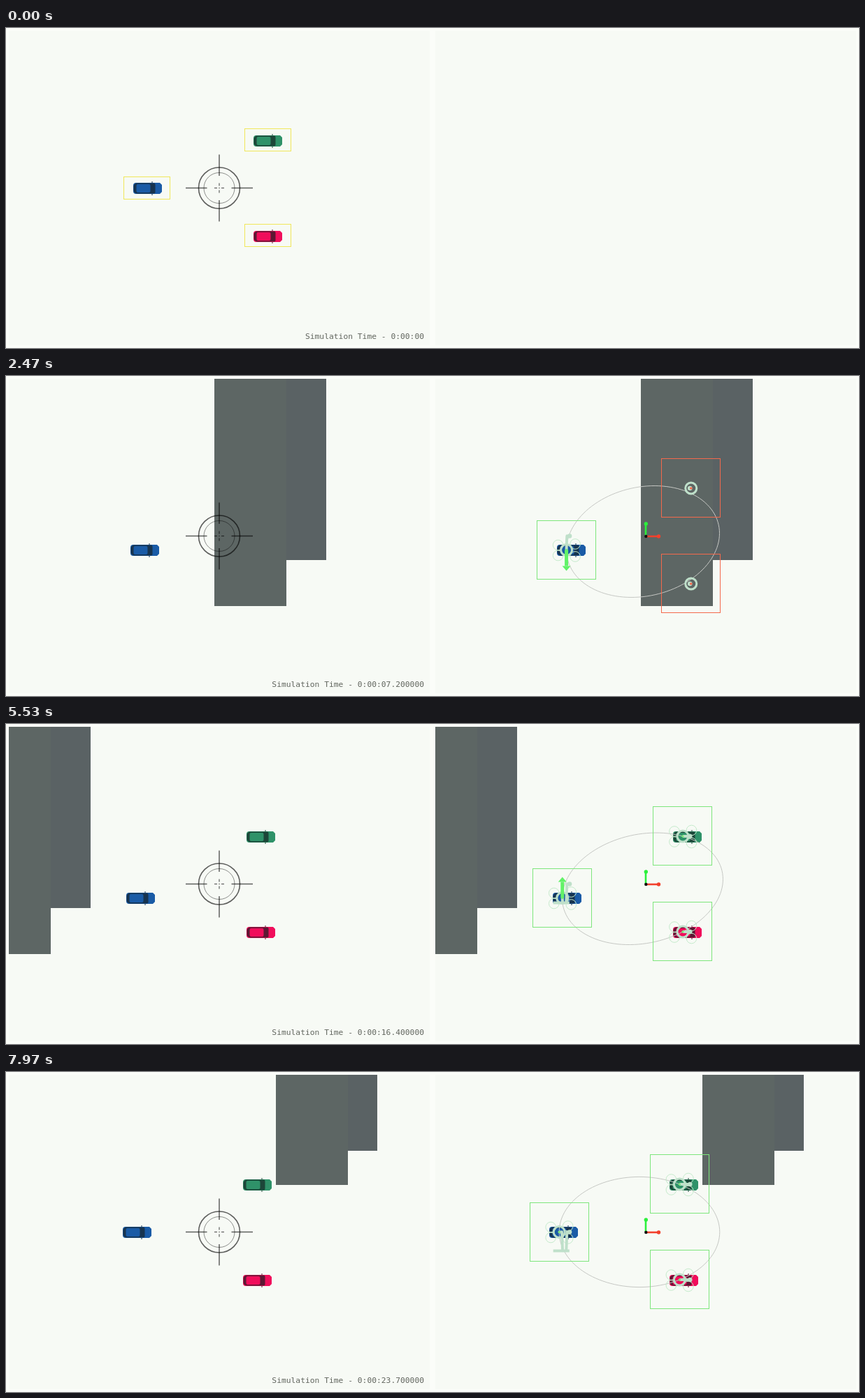
Animation of 1220 by 459 pixels, one loop 8 s. Source, as an HTML page with a canvas:

```html
<!DOCTYPE html>
<html>
<head>
<meta charset="utf-8">
<title>Vehicle tracking simulation</title>
<style>
html, body { margin: 0; width: 100%; height: 100%; overflow: hidden; background: #fbfdf9; }
canvas { display: block; }
</style>
</head>
<body>
<canvas id="stage" width="1220" height="459"></canvas>
<script>
const ctx = document.getElementById('stage').getContext('2d');
const TAU = Math.PI * 2, PALE = '#bfe0ca', GROUND = '#f7faf5', EDGE = '#fbfdf9';
const HALF_L = 20.5, HALF_W = 8.5, DRIFT = 0.63;

// lag: shift of the formation estimate while a car is hidden
const cars = [
  { x: 202.6, y: 230, body: '#1a5ba6', dark: '#17344f', lag: [-14, 12], swerves: true },
  { x: 374.8, y: 161.5, body: '#2f9269', dark: '#1d4639', lag: [-14, 2] },
  { x: 374.8, y: 298.5, body: '#f00e5b', dark: '#5c1833', lag: [-14, 2] }
];
const keypoints = [[-18.5, -7.5], [-18.5, 7.5], [6, -9], [6, 9]];

function smooth(a, b, v) {
  const u = Math.min(1, Math.max(0, (v - a) / (b - a)));
  return u * u * (3 - 2 * u);
}

function carAt(car, s) {
  const swerve = car.swerves ? 27 * (smooth(5.8, 7.9, s) - smooth(15.7, 17.8, s)) : 0;
  return { x: car.x - DRIFT * s, y: car.y + swerve };
}

// Rectangles: x, width, bottom, colour
function blocksAt(s) {
  const a = Math.round(386.4 - 36.7 * (s - 4.8)), b = Math.round(386.4 - 36.9 * (s - 23.7));
  return [
    [a, 103, 330, '#5d6664'], [a + 103, 57, 264, '#5a6264'],
    [b, 103, 162, '#5d6664'], [b + 103, 42, 113, '#5a6264']
  ];
}

function hiddenPart(p, s) {
  let area = 0;
  for (const [x, w, bottom] of blocksAt(s)) {
    const dx = Math.min(p.x + HALF_L, x + w) - Math.max(p.x - HALF_L, x);
    const dy = Math.min(p.y + HALF_W, bottom) - (p.y - HALF_W);
    if (dx > 0 && dy > 0) area += dx * Math.min(dy, 2 * HALF_W);
  }
  return area / (4 * HALF_L * HALF_W);
}

function trackAt(car, s) {
  const p = carAt(car, s), hidden = hiddenPart(p, s), k = smooth(0.2, 0.5, hidden);
  const recoil = car.swerves ? smooth(14.4, 15, s) - smooth(15, 15.6, s) : 0;
  return { x: p.x - 6.5 + 6 * k - 14 * recoil, y: p.y - 0.5, hidden, k, car: p };
}

// Share of the last two seconds spent out of sight
function lostShare(car, s) {
  let sum = 0;
  for (let i = 0; i < 10; i++) sum += trackAt(car, s - i * 0.2).k;
  return sum / 10;
}

function line(points, color, width) {
  ctx.beginPath();
  points.forEach(([x, y]) => ctx.lineTo(x, y));
  ctx.strokeStyle = color;
  ctx.lineWidth = width;
  ctx.stroke();
}

function circle(x, y, r, color, width) {
  ctx.beginPath();
  ctx.arc(x, y, r, 0, TAU);
  if (width) {
    ctx.strokeStyle = color;
    ctx.lineWidth = width;
    ctx.stroke();
  } else {
    ctx.fillStyle = color;
    ctx.fill();
  }
}

// Outline snapped to whole pixels
function box(x, y, w, h, color) {
  ctx.strokeStyle = color;
  ctx.lineWidth = 1;
  ctx.strokeRect(Math.floor(x - w / 2) + 0.5, Math.floor(y - h / 2) + 0.5, w, h);
}

function shape(points, color) {
  ctx.fillStyle = color;
  ctx.beginPath();
  points.forEach(([x, y]) => ctx.lineTo(x, y));
  ctx.fill();
}

function roundBox(x, y, w, h, r, color) {
  ctx.fillStyle = color;
  ctx.beginPath();
  ctx.roundRect(x, y, w, h, r);
  ctx.fill();
}

function drawCar(car, s) {
  const p = carAt(car, s);
  ctx.save();
  ctx.translate(Math.floor(p.x) + 0.5, Math.round(p.y));
  line([[6.5, -10], [6.5, 10]], car.dark, 1);
  roundBox(-HALF_L, -8, 36, 16, 4, car.body);
  shape([[10, -8], [17.5, -8], [20.5, -5], [20.5, 5], [17.5, 8], [10, 8]], car.body);
  roundBox(-20, -7.5, 31, 15, [5, 2, 2, 5], car.dark);
  roundBox(-16, -6, 20, 12, 2, car.body);
  ctx.restore();
}

function drawScene(s, started) {
  ctx.fillStyle = GROUND;
  ctx.fillRect(4, 4, 602, 451);
  cars.forEach(car => drawCar(car, s));
  if (!started) return;
  for (const [x, w, bottom, color] of blocksAt(s)) {
    ctx.fillStyle = color;
    ctx.fillRect(x, 4, w, bottom - 4);
  }
}

function drawSight() {
  const ink = 'rgba(0,0,0,.62)';
  ctx.save();
  ctx.translate(305, 229.5);
  circle(0, 0, 29.5, ink, 1.6);
  circle(0, 0, 22, ink, 0.7);
  for (let i = 0; i < 4; i++) {
    line([[17.5, 0], [48, 0]], ink, 1.5);
    line([[3, 0], [7, 0]], ink, 1.2);
    ctx.rotate(TAU / 4);
  }
  circle(0, 0, 0.8, ink);
  ctx.restore();
}

function drawClock(s) {
  const sec = String(Math.floor(s)).padStart(2, '0'), tenth = Math.round(s * 10) % 10;
  ctx.fillStyle = '#62665f';
  ctx.font = '11.3px "DejaVu Sans Mono", monospace';
  ctx.textAlign = 'right';
  ctx.fillText(`Simulation Time - 0:00:${sec}${tenth ? `.${tenth}00000` : ''}`, 598, 445.5);
}

// Ellipse of least area through the three estimated points
function drawFormation(tracks, s) {
  const [a, b, c] = tracks.map((t, i) => {
    const lost = lostShare(cars[i], s), [dx, dy] = cars[i].lag;
    return [t.car.x - 6.5 + (dx + 6) * lost, t.y + dy * lost];
  });
  const mid = [0, 1].map(j => (a[j] + b[j] + c[j]) / 3);
  const points = [];
  for (let i = 0; i <= 120; i++) {
    const u = TAU * i / 120;
    points.push(mid.map((m, j) =>
      m + (a[j] - m) * Math.cos(u) + (c[j] - b[j]) / Math.sqrt(3) * Math.sin(u)));
  }
  line(points, '#c6c8c4', 1);
}

function drawTrack(car, t, s) {
  const color = t.hidden > 0.88 ? '#f4694c' : t.hidden > 0.4 ? '#eda45c' : '#7ee67c';
  const blocks = blocksAt(s);
  for (const [dx, dy] of keypoints) {
    const x = t.car.x + dx, y = t.car.y + dy;
    const covered = blocks.some(([bx, w, bottom]) => x > bx - 1 && x < bx + w + 4 && y < bottom + 4);
    if (!covered) circle(x, y, 7.3, '#c5ebcc', 1);
  }
  const trail = [];
  for (let u = 0; u <= s + 0.01; u += 0.1) {
    const p = trackAt(car, u);
    trail.push([p.x, p.y]);
  }
  line(trail, PALE, 4);
  circle(...trail[0], 3.2, PALE);
  circle(t.x, t.y, 8, PALE, 3);
  circle(t.x, t.y, 1.8, color);

  const vy = (carAt(car, s + 0.05).y - carAt(car, s - 0.05).y) * 10;
  if (Math.abs(vy) > 2) {
    const tip = t.y + vy * 1.75, head = tip - Math.sign(vy) * 7;
    line([[t.x, t.y], [t.x, head]], '#62f268', 5);
    shape([[t.x - 6, head], [t.x + 6, head], [t.x, tip]], '#62f268');
  }
  box(t.x, t.y - 0.3, 84, 84, color);
}

function drawAxes() {
  line([[305, 230], [323, 230]], '#f2402c', 2.6);
  line([[305, 230], [305, 212]], '#2cf03c', 2.6);
  circle(323.5, 230, 2.7, '#f2402c');
  circle(305.3, 212, 2.7, '#2cf03c');
  circle(305.3, 230, 2.2, '#111');
}

function panel(offset, draw) {
  ctx.save();
  ctx.translate(offset, 0);
  ctx.beginPath();
  ctx.rect(4, 4, 602, 451);
  ctx.clip();
  draw();
  ctx.restore();
}

const start = performance.now();
function frame() {
  const time = Math.max(0, performance.now() - start) % 8000;
  const step = Math.floor((time + 4) * 0.03);
  const s = Math.max(0, step - 2) / 10, started = step >= 2;
  ctx.fillStyle = EDGE;
  ctx.fillRect(0, 0, 1220, 459);
  panel(0, () => {
    drawScene(s, started);
    if (!started) cars.forEach(c => box(c.x - 0.8, c.y - 0.7, 66, 32, '#f0e75a'));
    drawSight();
    drawClock(s);
  });
  panel(610, () => {
    ctx.fillStyle = GROUND;
    ctx.fillRect(4, 4, 602, 451);
    if (!started) return;
    drawScene(s, true);
    const tracks = cars.map(c => trackAt(c, s));
    drawFormation(tracks, s);
    cars.forEach((c, i) => drawTrack(c, tracks[i], s));
    drawAxes();
  });
  requestAnimationFrame(frame);
}
frame();
</script>
</body>
</html>
```
